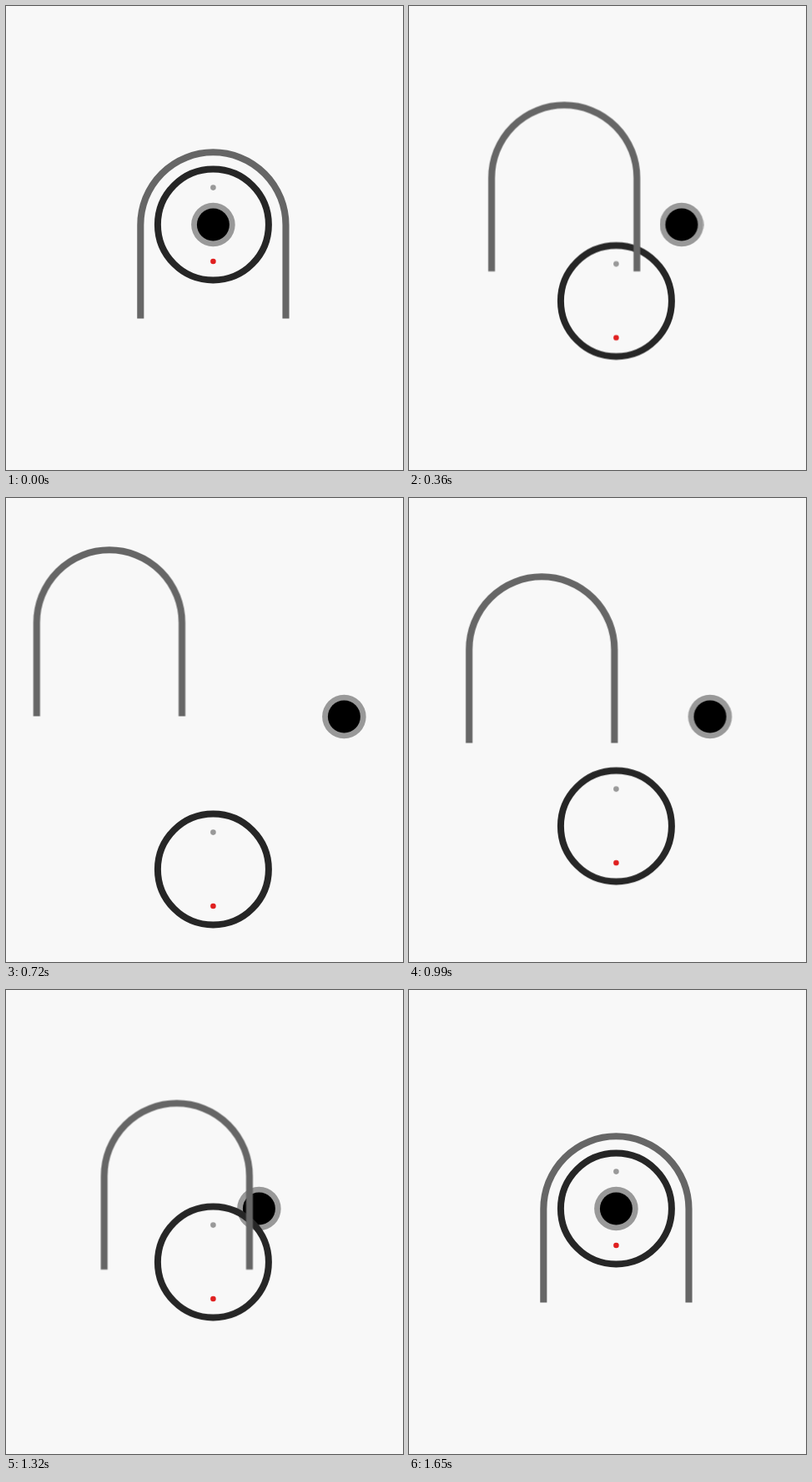
An HTML page without scripts for the animation above (2.25 s loop, 476 px wide and 556 px high).

```html
<!DOCTYPE html>
<html lang="en">
<head>
<meta charset="utf-8">
<title>Exploded camera</title>
<style>
  html, body {
    margin: 0;
    width: 100%;
    height: 100%;
    overflow: hidden;
    background: #f8f8f8;
  }
  svg { display: block; width: 476px; height: 556px; }

  .part {
    --x: 0px;
    --y: 0px;
    animation: explode 2250ms -1ms infinite;
  }
  .lens { --x: 157px; }
  .ring { --y: 183px; }
  .arch { --x: -124.5px; --y: -113px; }

  /* Out in 24 ticks of 30 ms, back in 30, then rest */
  @keyframes explode {
    0% {
      transform: translate(0px, 0px);
      animation-timing-function: steps(24, end);
    }
    32% {
      transform: translate(var(--x), var(--y));
      animation-timing-function: steps(1, end);
    }
    33.3333% {
      transform: translate(calc(var(--x) * .98333), calc(var(--y) * .98333));
      animation-timing-function: steps(30, jump-none);
    }
    73.3332% {
      transform: translate(calc(var(--x) * .01667), calc(var(--y) * .01667));
      animation-timing-function: steps(1, end);
    }
    73.3333%, 100% { transform: translate(0px, 0px); }
  }
</style>
</head>
<body>
<svg viewBox="0 0 476 556">
  <g class="part lens">
    <circle cx="248.4" cy="262" r="26.3" fill="#999"/>
    <circle cx="248.4" cy="262" r="19.5"/>
  </g>
  <g class="part ring">
    <circle cx="248.4" cy="262" r="66.5" fill="none" stroke="#262626" stroke-width="8"/>
    <circle cx="248.4" cy="217.6" r="3.3" fill="#999"/>
    <circle cx="248.4" cy="306" r="3.3" fill="#e02020"/>
  </g>
  <path class="part arch" d="M161.3 374.5V262.4a87.1 87.1 0 0 1 174.2 0V374.5"
        fill="none" stroke="#666" stroke-width="8.1"/>
</svg>
</body>
</html>
```
